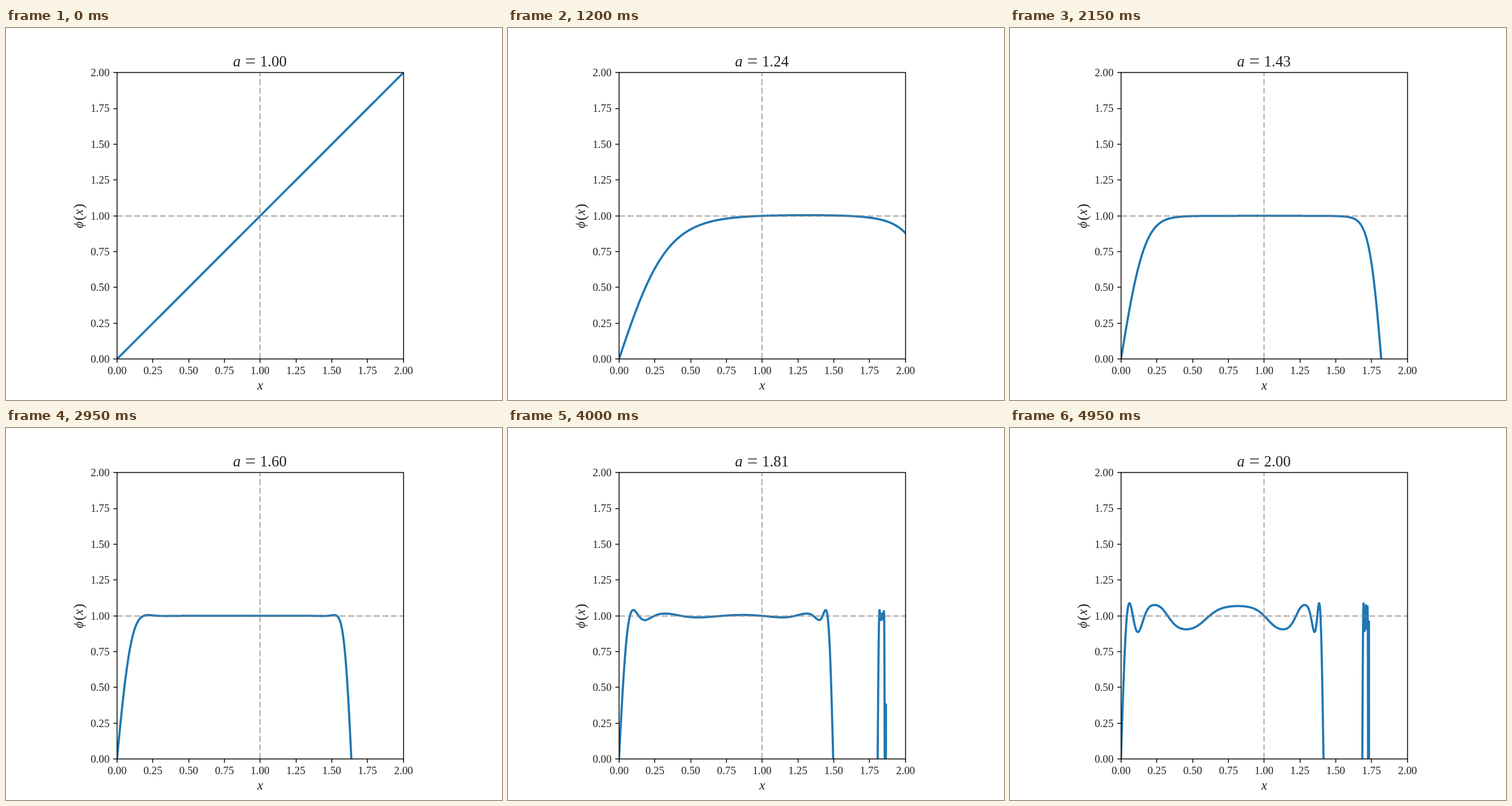
An HTML page with a canvas for the animation above (5 s loop, 864x648 px).

```html
<!DOCTYPE html>
<html lang="en">
<head>
<meta charset="utf-8">
<title>Iterated cubic map</title>
<style>
  html, body { margin: 0; width: 100%; height: 100%; overflow: hidden; background: #fff; }
  canvas { display: block; }
</style>
</head>
<body>
<canvas id="stage" width="864" height="648"></canvas>
<script>
const ctx = document.getElementById('stage').getContext('2d');
const SIDE = 498.96, LEFT = 193.32, BOTTOM = 576.72;
const SERIF = '"Liberation Serif", "Noto Serif", serif';
const INK = '#222';
const STEPS = 100, STEP_MS = 50, SAMPLES = 1000, ITERATIONS = 5;

const toX = x => LEFT + x * SIDE / 2;
const toY = y => BOTTOM - y * SIDE / 2;
const snap = v => Math.floor(v) + 0.5;

function phi(x, a) {
  for (let i = 0; i < ITERATIONS; i++) x = a * x - (a - 1) * x ** 3;
  return x;
}

function text(str, x, y, size, { italic = false, align = 'left', color = INK } = {}) {
  ctx.font = `${italic ? 'italic ' : ''}${size}px ${SERIF}`;
  ctx.fillStyle = color;
  if (align !== 'left') {
    const ink = ctx.measureText(str);
    const l = -ink.actualBoundingBoxLeft, r = ink.actualBoundingBoxRight;
    x -= align === 'center' ? (l + r) / 2 : r;
  }
  ctx.fillText(str, x, y);
}

function segment(x1, y1, x2, y2) {
  ctx.beginPath();
  ctx.moveTo(x1, y1);
  ctx.lineTo(x2, y2);
  ctx.stroke();
}

function drawCurve(a) {
  ctx.strokeStyle = '#1f77b4';
  ctx.lineWidth = 3.75;
  ctx.lineJoin = 'round';
  ctx.lineCap = 'square';
  ctx.beginPath();
  for (let i = 0; i < SAMPLES; i++) {
    const x = 2 * i / (SAMPLES - 1);
    const y = Math.max(-2000, Math.min(2000, phi(x, a)));
    ctx.lineTo(toX(x), toY(y));
  }
  ctx.stroke();
}

function drawGuides() {
  const x0 = snap(toX(0)), x1 = snap(toX(1)), x2 = snap(toX(2));
  const y0 = snap(toY(0)), y1 = snap(toY(1)), y2 = snap(toY(2));
  ctx.strokeStyle = 'rgba(128, 128, 128, 0.5)';
  ctx.lineWidth = 2.8125;
  ctx.lineCap = 'butt';
  ctx.setLineDash([3.7 * 2.8125, 1.6 * 2.8125]);
  segment(x0, y1, x2, y1);
  segment(x1, y0, x1, y2);
  ctx.setLineDash([]);
}

function drawAxes() {
  const left = snap(toX(0)), right = snap(toX(2));
  const bottom = snap(toY(0)), top = snap(toY(2));
  ctx.strokeStyle = '#000';
  ctx.lineWidth = 1.5;
  ctx.lineJoin = 'miter';
  ctx.strokeRect(left, top, right - left, bottom - top);
  for (let v = 0; v <= 2; v += 0.25) {
    const x = snap(toX(v)), y = snap(toY(v)), label = v.toFixed(2);
    segment(x, bottom, x, bottom + 6.56);
    segment(left, y, left - 6.56, y);
    text(label, toX(v), 603, 18.9, { align: 'center' });
    text(label, 180, toY(v) + 6.3, 18.9, { align: 'right' });
  }
  text('x', 442.8, 630, 23, { italic: true, align: 'center' });

  ctx.save();
  ctx.translate(133.6, 327.24);
  ctx.rotate(-Math.PI / 2);
  text('ϕ', -21.4, 0, 22.5, { italic: true });
  text('(', -8, 0.9, 26);
  text('x', 1.2, 0, 23, { italic: true });
  text(')', 12.6, 0.9, 26);
  ctx.restore();
}

function drawTitle(a) {
  text('a', 395.5, 67, 26.5, { italic: true });
  text('=', 416.5, 68.5, 33, { color: '#444' });
  text(a.toFixed(2), 442.5, 67, 26.5);
}

function draw(step) {
  const a = 1 + step / (STEPS - 1);
  ctx.fillStyle = '#fff';
  ctx.fillRect(0, 0, 864, 648);
  ctx.save();
  ctx.beginPath();
  ctx.rect(LEFT, BOTTOM - SIDE, SIDE, SIDE);
  ctx.clip();
  drawCurve(a);
  drawGuides();
  ctx.restore();
  drawAxes();
  drawTitle(a);
}

const start = performance.now();
function tick() {
  draw(Math.floor((performance.now() - start) / STEP_MS) % STEPS);
  requestAnimationFrame(tick);
}
tick();
</script>
</body>
</html>
```
